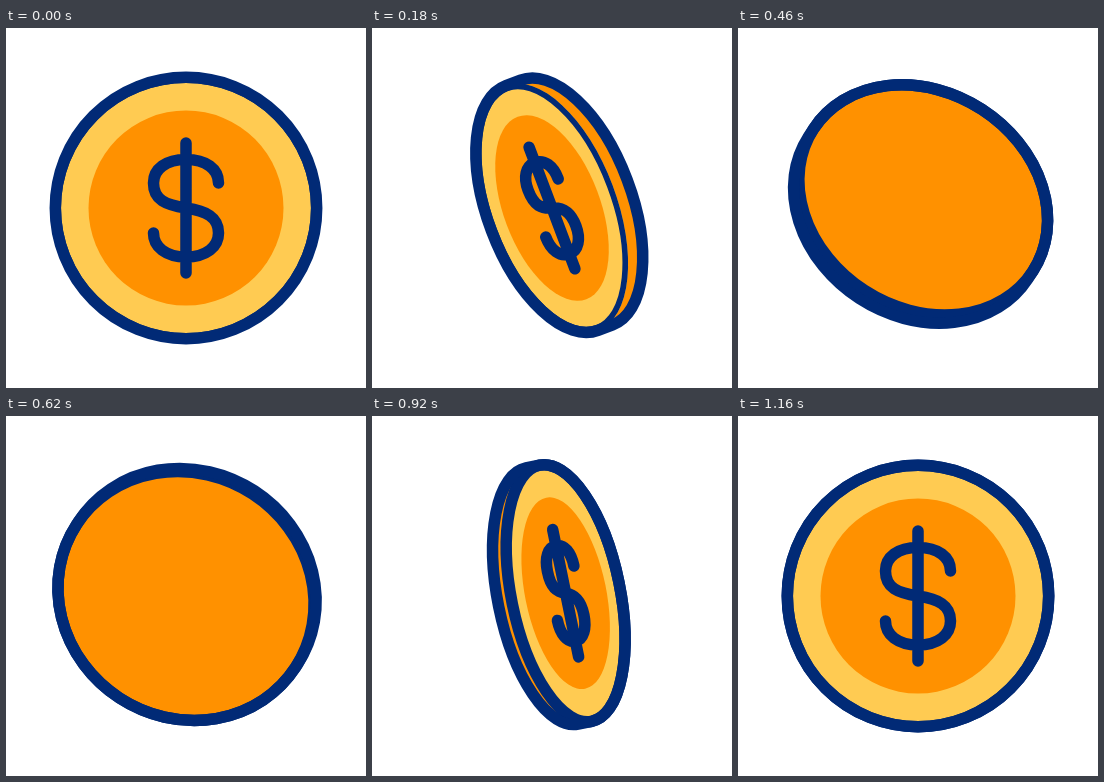
Write an HTML page with a canvas that moves like this. It is 360 px wide and 360 px high and loops after 1400 ms.

```html
<!DOCTYPE html>
<html>
<head>
<meta charset="utf-8">
<style>
html, body { margin: 0; height: 100%; overflow: hidden; background: #fff; }
canvas { display: block; }
</style>
</head>
<body>
<canvas id="stage" width="360" height="360"></canvas>
<script>
const ctx = document.getElementById('stage').getContext('2d');
const LOOP = 1400, SPIN = 1160, R = 130.7;
const NAVY = '#012a76', ORANGE = '#ff9100', YELLOW = '#ffcb52';
const dollar = new Path2D('M0-65V65M32.5-25C32.5-39 20-48.5 0-48.5S-32.5-39-32.5-25' +
  'C-32.5-8-20-3 0 0S32.5 9 32.5 25C32.5 39 20 49 0 49S-32.5 39-32.5 25');

// Pose keys: time, flip angle, tilt (degrees), rim depth
const keys = [
  [0, 0, 0, 0], [180, 60, 20.5, 15.5], [290, 90, 41, 24.5], [340, 104.3, 50.6, 23],
  [560, 180, 60, 0], [620, 201, 57, 3.6], [780, 252, 32.3, 24],
  [920, 294.3, 11.6, 14], [SPIN, 360, 0, 0]
];

// Smooth cubic through the keys; tilt and depth rest at both ends
function pose(t) {
  let i = 0;
  while (i < keys.length - 2 && t > keys[i + 1][0]) i++;
  const a = keys[i], b = keys[i + 1], span = b[0] - a[0], u = (t - a[0]) / span;
  const slope = (k, j) => {
    const prev = keys[k - 1], next = keys[k + 1];
    if (!prev || !next) return j === 1 ? 0.3 : 0;
    return (next[j] - prev[j]) / (next[0] - prev[0]);
  };
  return [1, 2, 3].map(j =>
    a[j] * (1 + 2 * u) * (1 - u) ** 2 + b[j] * u * u * (3 - 2 * u) +
    span * (slope(i, j) * u * (1 - u) ** 2 - slope(i + 1, j) * u * u * (1 - u)));
}

function disc(x, squash, r, fill) {
  ctx.beginPath();
  ctx.ellipse(x, 0, r * squash, r, 0, 0, 2 * Math.PI);
  ctx.fillStyle = fill;
  ctx.fill();
}

function draw(t) {
  const [flip, tilt, rim] = pose(Math.min(t, SPIN));
  const depth = Math.max(0, rim), cos = Math.cos(flip * Math.PI / 180), squash = Math.abs(cos);
  const front = cos > 0, firstHalf = flip < 180;
  const x = front === firstHalf ? 0 : depth;

  ctx.setTransform(1, 0, 0, 1, 0, 0);
  ctx.fillStyle = '#fff';
  ctx.fillRect(0, 0, 360, 360);
  ctx.translate(180, 180);
  ctx.rotate(-tilt * Math.PI / 180);
  ctx.lineWidth = 11.5;
  ctx.lineCap = ctx.lineJoin = 'round';
  ctx.strokeStyle = NAVY;

  const body = new Path2D();
  body.ellipse(0, 0, R * squash, R, 0, Math.PI / 2, Math.PI * 1.5);
  body.ellipse(depth, 0, R * squash, R, 0, -Math.PI / 2, Math.PI / 2);
  body.closePath();
  ctx.fillStyle = ORANGE;
  ctx.fill(body);

  // The opening face keeps only the inner half of its outline
  ctx.save();
  disc(x, squash, R, front ? YELLOW : ORANGE);
  if (front && firstHalf) ctx.clip();
  ctx.stroke();
  ctx.restore();
  ctx.stroke(body);

  if (!front) return;
  disc(x, squash, 97.5, ORANGE);
  const mark = new Path2D();
  mark.addPath(dollar, new DOMMatrix([squash, 0, 0, 1, x, 0]));
  ctx.stroke(mark);
}

function frame(now) {
  draw(now % LOOP);
  requestAnimationFrame(frame);
}
requestAnimationFrame(frame);
</script>
</body>
</html>
```
